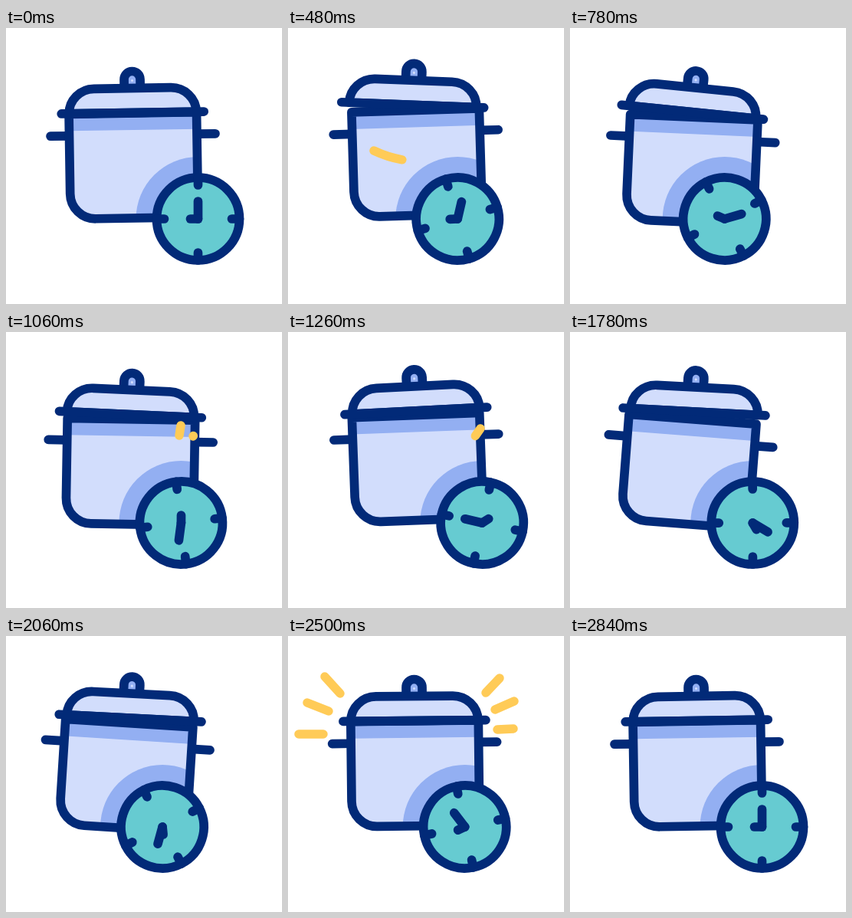
Write an HTML page that moves like this. It is 360 px wide and 360 px high and loops after 2900 ms.

```html
<!DOCTYPE html>
<html lang="en">
<head>
<meta charset="utf-8">
<title>Cooking time</title>
<style>
  html, body { margin: 0; height: 100%; overflow: hidden; background: #fff; }
  svg { display: block; width: 100vw; height: 100vh; }
  path { stroke-linecap: round; stroke-linejoin: round; }
  .ink { fill: none; stroke: #022a78; stroke-width: 11.7; }
  .light { fill: #d2ddfc; }
  .mid { fill: #93aff2; }
  .teal { fill: #66cbd1; }
  #marks { fill: none; stroke: #ffcb57; stroke-width: 11.5; }
</style>
</head>
<body>
<svg viewBox="0 0 360 360">
  <defs>
    <path id="shell" d="M-83-28.5V75.5a33 33 0 0 0 33 33H50.5a33 33 0 0 0 33-33V-28.5Z"/>
    <clipPath id="inside"><use href="#shell"/></clipPath>
  </defs>
  <g id="pot">
    <path class="ink" d="M-107.5 0H-83M83.5 0H107.5"/>
    <use href="#shell" class="light"/>
    <g clip-path="url(#inside)">
      <path class="mid" d="M-90-28.5H90V-6.5H-90Z"/>
      <circle id="shade" class="mid" r="81"/>
    </g>
    <use href="#shell" class="ink"/>
  </g>
  <g id="lid">
    <path class="ink mid" d="M-10.5-33V-43.5a10.5 10.5 0 0 1 21 0V-33"/>
    <circle class="light" cy="-42" r="1.6"/>
    <path class="ink light" d="M-83 0a33 32 0 0 1 33-32H50a33 32 0 0 1 33 32Z"/>
    <path class="ink" d="M-93 0H93"/>
  </g>
  <g id="marks"></g>
  <g id="clock">
    <circle class="ink teal" r="54"/>
    <path class="ink" d="M0-54V-44M0 54V44M-54 0H-44M54 0H44"/>
    <path id="minute" class="ink" d="M0 0V-23"/>
    <path id="hour" class="ink" d="M0 0V-10"/>
  </g>
</svg>
<script>
const LOOP = 2900;
const ROLL = [180, 720, 1480, 2140, 2780];             // turning points of the clock
const ROCK = [180, 490, 840, 1450, 1910, 2260, 2820];  // turning points of pot and lid
const $ = id => document.getElementById(id);

// Smooth 0..1 progress between two times
const ease = (t, from, to) => {
  const u = Math.min(1, Math.max(0, (t - from) / (to - from)));
  return u * u * (3 - 2 * u);
};

// Offset that leaves rest, eases through one peak per inner beat and returns to rest
const swing = (t, beats, ...peaks) => [...peaks, 0].reduce((sum, peak, i) =>
  sum + (peak - (peaks[i - 1] ?? 0)) * ease(t, beats[i], beats[i + 1]), 0);

const place = (id, x, y, turn) =>
  $(id).setAttribute('transform', `translate(${x} ${y}) rotate(${turn})`);

const addMark = (d, start) => {
  const el = document.createElementNS('http://www.w3.org/2000/svg', 'path');
  el.setAttribute('d', d);
  el.setAttribute('pathLength', 100);
  $('marks').append(el);
  return { el, start };
};

const rays = ['M68 75L48 53', 'M53 98L25 87', 'M46 128H14',
  'M258 74L276 55', 'M270 96L295 85', 'M273 122L294 121'];
const marks = [
  addMark('M112 160Q148 177 186 173', 400),
  addMark('M226 135L228 122', 900),
  addMark('M244 136L251 126', 1040),
  addMark('M108 177Q145 187 182 176', 1310),
  ...rays.map(d => addMark(d, 2330)),
];

// Each mark draws itself, holds briefly, then erases from its start
function drawMark({ el, start }, t) {
  const head = 100 * ease(t, start, start + 160);
  const tail = 100 * ease(t, start + 200, start + 360);
  el.style.display = head - tail > .5 ? '' : 'none';
  el.style.strokeDasharray = `${head - tail} 300`;
  el.style.strokeDashoffset = -tail;
}

function draw(t) {
  const clockX = 250.5 + swing(t, ROLL, -50, 16, -49);
  const clockY = 249;
  const progress = ease(t, 160, 2800);
  place('clock', clockX, clockY, swing(t, ROLL, -28, 22, -29));
  place('minute', 0, 0, 720 * progress);
  place('hour', 0, 0, 270 + 360 * progress);

  const rock = swing(t, ROCK, -.8, 3.8, -2.7, 7.2, .4);
  const potX = 165.5 - 1.5 * rock;
  const potY = 139.5 + swing(t, ROCK, -3.6, 6, -5, 4.5, -.3);
  const potTurn = rock - .9;
  place('pot', potX, potY, potTurn);
  // The shade stays centred on the clock while the pot rocks
  $('shade').setAttribute('transform',
    `rotate(${-potTurn}) translate(${clockX - potX} ${clockY - potY})`);

  const tilt = swing(t, ROCK, 3.1, 7, -4.7, 6, .6);
  place('lid', 165.2 - .8 * tilt, 110.5 + swing(t, ROCK, -10.2, 0, -9.9, -5.8, 0), tilt - .9);

  marks.forEach(mark => drawMark(mark, t));
}

const begin = performance.now();
function tick() {
  draw((performance.now() - begin) % LOOP);
  requestAnimationFrame(tick);
}
tick();
</script>
</body>
</html>
```
